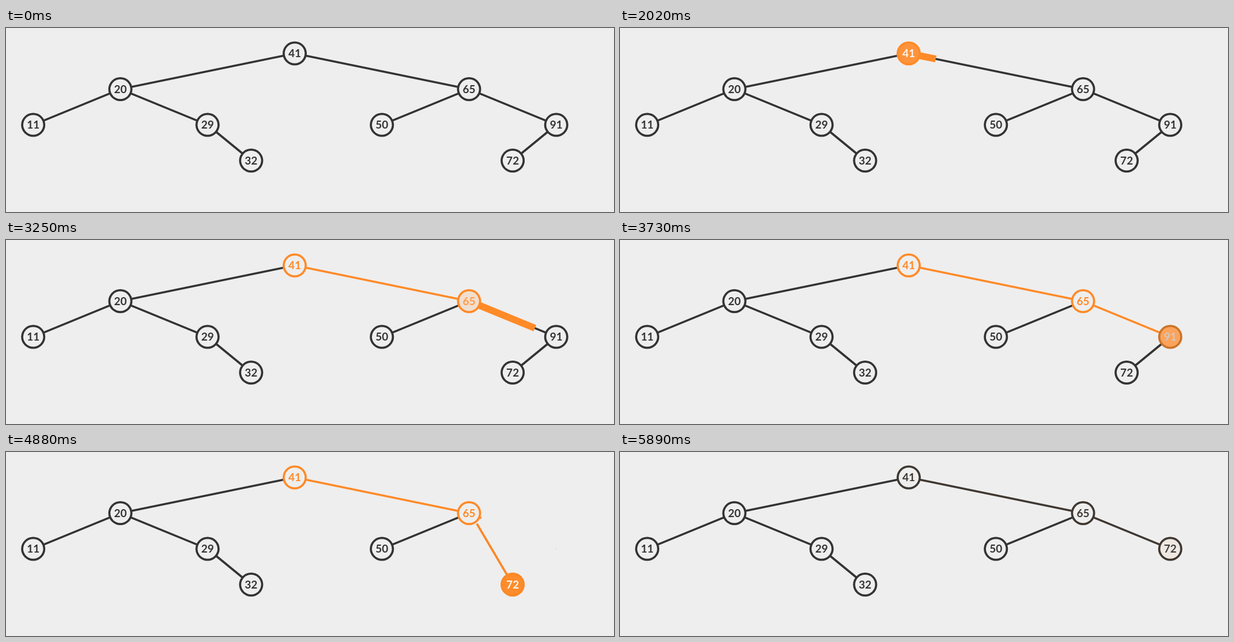
An HTML page with a canvas for the animation above (6750 ms loop, 1055x322 px).

```html
<!DOCTYPE html>
<html lang="en">
<head>
<meta charset="utf-8">
<title>Binary search tree removal</title>
<style>
  html, body { margin: 0; width: 100%; height: 100%; overflow: hidden; background: #eee; }
  canvas { display: block; }
</style>
</head>
<body>
<canvas id="stage" width="1055" height="322"></canvas>
<script>
const ctx = document.getElementById('stage').getContext('2d');
const LOOP = 6750, MOVE = 500, RADIUS = 20;

// Runs of picture steps: first time, last time, number of steps
const RUNS = [
  [1530, 2160, 10], [2210, 2830, 9], [2890, 3520, 10], [3580, 4190, 9],
  [4270, 4880, 9], [4950, 5610, 11], [5680, 5890, 4]
];

const DARK = [51, 51, 51], PAPER = [238, 238, 238], WHITE = [255, 255, 255], ORANGE = [255, 138, 39];
// A node style is [ring, fill, text]
const BASE = [DARK, PAPER, DARK], HOT = [ORANGE, ORANGE, WHITE], VISITED = [ORANGE, PAPER, ORANGE];

const stage = i => 1352 + 520 * i;
const REMOVE = stage(6), RELAYOUT = stage(7), RESET = stage(8);

const spot = (column, level) => [47.2 + 75.63 * column, 44.5 + 62.5 * level];
const nodes = {
  41: { at: spot(6, 0), keys: [[stage(0), HOT], [stage(1), VISITED], [RESET, BASE]] },
  20: { at: spot(2, 1) },
  65: { at: spot(10, 1), keys: [[stage(2), HOT], [stage(3), VISITED], [RESET, BASE]] },
  11: { at: spot(0, 2) },
  29: { at: spot(4, 2) },
  50: { at: spot(8, 2) },
  91: { at: spot(12, 2), keys: [[stage(4), HOT]] },
  32: { at: spot(5, 3) },
  72: { at: spot(11, 3), keys: [[REMOVE, HOT], [RESET, BASE]] }
};
const plainEdges = [[41, 20], [20, 11], [20, 29], [29, 32], [65, 50]];

const mix = (a, b, k) => a.map((v, i) => v + (b[i] - v) * k);
const mixStyle = (a, b, k) => a.map((c, i) => mix(c, b[i], k));
const css = c => `rgb(${c.map(Math.round)})`;

// Cubic in-out progress of a transition that begins at start
function progress(t, start) {
  const p = Math.min(1, Math.max(0, (t - start) / MOVE));
  return p < 0.5 ? 4 * p ** 3 : 1 - 4 * (1 - p) ** 3;
}

function stepTime(t) {
  let shown = 0;
  for (const [first, last, count] of RUNS) {
    if (t < first) break;
    const gap = (last - first) / (count - 1);
    shown = Math.min(last, first + gap * Math.floor((t - first + 8) / gap));
  }
  return shown;
}

// Segment between the rims of two nodes
function span(a, b) {
  const d = Math.hypot(b[0] - a[0], b[1] - a[1]);
  return [...mix(a, b, RADIUS / d), ...mix(b, a, RADIUS / d)];
}
const link = (a, b) => span(nodes[a].at, nodes[b].at);

function shorten([x1, y1, x2, y2], k) {
  return [x1, y1, ...mix([x1, y1], [x2, y2], k)];
}

function line([x1, y1, x2, y2], color, width = 3.7) {
  ctx.strokeStyle = css(color);
  ctx.lineWidth = width;
  ctx.beginPath();
  ctx.moveTo(x1, y1);
  ctx.lineTo(x2, y2);
  ctx.stroke();
}

function disc(r, color) {
  ctx.fillStyle = css(color);
  ctx.beginPath();
  ctx.arc(0, 0, r, 0, 2 * Math.PI);
  ctx.fill();
}

function drawNode(label, [x, y], [ring, fill, text], size) {
  if (size <= 0) return;
  ctx.save();
  ctx.translate(x, y);
  ctx.scale(size, size);
  disc(21, ring);
  disc(17.3, fill);
  ctx.fillStyle = css(text);
  ctx.fillText(label, 0, 6.7);
  ctx.restore();
}

// Edge crossed by a thick stroke that then stays orange
function drawSweep(segment, start, t) {
  const done = t >= start + MOVE;
  line(segment, done ? mix(ORANGE, DARK, progress(t, RESET)) : DARK);
  if (!done && t > start) line(shorten(segment, progress(t, start)), ORANGE, 12);
}

function draw(t) {
  const removed = progress(t, REMOVE), moved = progress(t, RELAYOUT);
  const target = nodes[91].at;

  ctx.fillStyle = css(PAPER);
  ctx.fillRect(0, 0, 1055, 322);
  ctx.font = '700 19px Lato, "Open Sans", sans-serif';
  ctx.textAlign = 'center';

  for (const [a, b] of plainEdges) line(link(a, b), DARK);
  drawSweep(link(41, 65), stage(1), t);
  if (removed < 1) drawSweep(shorten(link(65, 91), 1 - removed), stage(3), t);

  const joined = mix(link(91, 72), link(65, 72), removed);
  const color = mix(mix(DARK, ORANGE, removed), DARK, progress(t, RESET));
  line(mix(joined, link(65, 91), moved), color);

  for (const label in nodes) {
    const { at, keys = [] } = nodes[label];
    const style = keys.reduce((s, [start, next]) => mixStyle(s, next, progress(t, start)), BASE);
    const place = label === '72' ? mix(at, target, moved) : at;
    drawNode(label, place, style, label === '91' ? 1 - removed : 1);
  }
}

const begin = performance.now();
function frame() {
  draw(stepTime((performance.now() - begin) % LOOP));
  requestAnimationFrame(frame);
}
frame();
</script>
</body>
</html>
```
